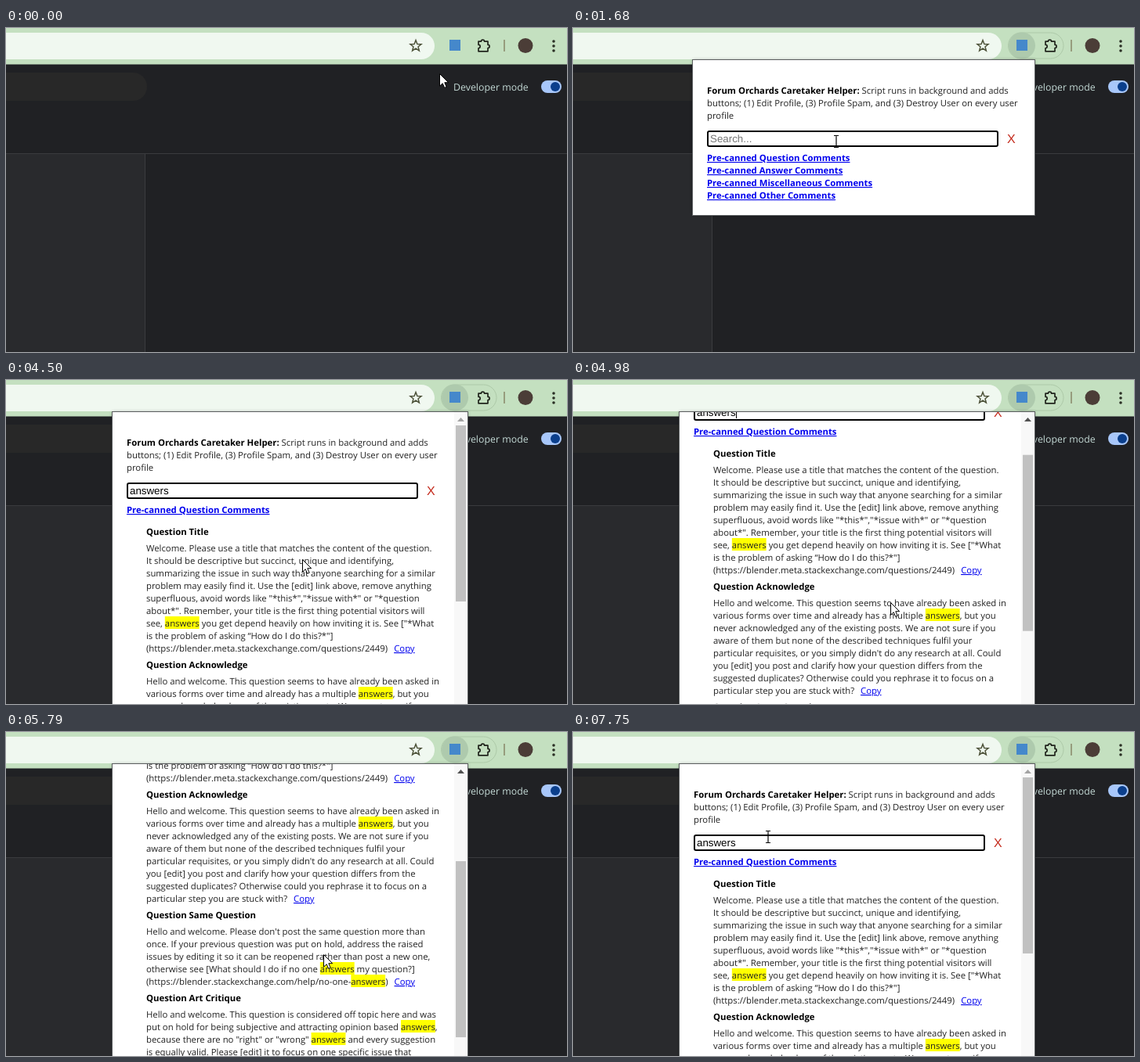
Write an HTML page that moves like this. It is 716 px wide and 414 px high and loops after 8000 ms.

```html
<!DOCTYPE html>
<html lang="en">
<head>
<meta charset="utf-8">
<title>Comment search popup</title>
<style>
html, body { margin: 0; width: 100%; height: 100%; overflow: hidden; background: #202124; }
svg { display: block; width: 716px; height: 414px; text-rendering: geometricPrecision; }
text { font: 11.33px "Open Sans", sans-serif; fill: #222; white-space: pre; }
.b { font-weight: 700; fill: #000; }
.link { fill: #00e; text-decoration: underline; }
.field { font: 13.33px "Liberation Sans", Arial, sans-serif; fill: #000; }
.hint { fill: #757575; }
.clear { font: 16px "Liberation Sans", Arial, sans-serif; fill: #c42a1c; }
.mode { font-size: 12.37px; fill: #c3d9d5; }
</style>
</head>
<body>
<svg viewBox="0 0 716 414">
  <defs>
    <filter id="blur" x="-5%" y="-5%" width="110%" height="110%"><feGaussianBlur stdDeviation="2"/></filter>
    <clipPath id="view"><rect id="viewBox" y="41" height="400"/></clipPath>
  </defs>

  <!-- page -->
  <rect width="716" height="414" fill="#202124"/>
  <rect x="-40" y="57" width="220" height="36" rx="18" fill="#282828"/>
  <rect y="161" width="177" height="253" fill="#292a2d"/>
  <path d="M0 160.5H716M177.5 161V414" stroke="#3a3b3e" fill="none"/>
  <text class="mode" x="571" y="80">Developer mode</text>
  <rect x="683" y="67" width="26" height="16" rx="8" fill="#a8c7fa"/>
  <circle cx="701" cy="75" r="6" fill="#0b3f8c"/>

  <!-- toolbar -->
  <rect width="716" height="46.5" fill="#c4e0c0"/>
  <rect x="-40" y="6" width="587" height="34" rx="17" fill="#f0f8f0"/>
  <g id="hover">
    <rect x="555.5" y="6" width="70.5" height="33" rx="16.5" fill="none" stroke="#adc9a8"/>
    <circle id="press" cx="573" cy="22.5" r="17" fill="#aecaad"/>
  </g>
  <polygon id="star" fill="none" stroke="#4d5239" stroke-width="1.5"/>
  <rect x="566" y="15" width="14" height="14" fill="#4588cb"/>
  <path d="M603 17.2h3.4a2.1 2.1 0 0 1 4.2 0h4.4v4.2a2.1 2.1 0 0 1 0 4.2v4.2h-12v-4a2.1 2.1 0 0 0 0-4.4z"
        fill="none" stroke="#20241c" stroke-width="1.7" stroke-linejoin="round"/>
  <rect x="635" y="15" width="2" height="15" fill="#979c7d"/>
  <circle cx="663" cy="22.5" r="9.5" fill="#4b3d37"/>
  <g fill="#2a2f24">
    <circle cx="699" cy="17" r="1.8"/><circle cx="699" cy="23" r="1.8"/><circle cx="699" cy="29" r="1.8"/>
  </g>

  <!-- popup -->
  <g id="popup">
    <rect id="shadow" y="41" fill="#000" opacity=".4" filter="url(#blur)"/>
    <rect id="panel" y="40.5" fill="#fff" stroke="#5b5e60"/>
    <g clip-path="url(#view)">
      <g id="scroller">
        <g id="content"></g>
        <rect id="caret" y="134" width="1" height="15"/>
      </g>
    </g>
    <g id="bar">
      <rect x="572" y="41" width="17" height="373" fill="#f8f8f8"/>
      <path id="arrow" d="M576 53l4.5-5 4.5 5z"/>
      <rect id="thumb" x="574" width="13" fill="#c1c1c1"/>
    </g>
  </g>

  <g id="pointer">
    <path id="tip" d="M.5.5V16.2L4.2 12.7 6.7 18.4 9.2 17.3 6.8 11.7H11.7Z" fill="#fff" stroke="#000"/>
    <path id="beam" d="M-3-7.5h2.5l.5.5.5-.5H3M-3 7.5h2.5l.5-.5.5.5H3M0-7V7" fill="none" stroke="#000" stroke-width="1.2"/>
  </g>
</svg>
<script>
const LOOP = 8000;
const $ = id => document.getElementById(id);

const intro = [
  'Script runs in background and adds',
  'buttons; (1) Edit Profile, (3) Profile Spam, and (3) Destroy User on every user',
  'profile'
];
const groups = ['Question', 'Answer', 'Miscellaneous', 'Other'];
const items = [
  ['Question Unanswerable', `Hello and welcome. As it stands this question is unanswerable and was
put on hold for lack of essential details to understand the issue.
Risking stating the obvious, only you have access to your scene, so
unless you describe it thoroughly you alone know your exact setup,
settings and what steps you took to arrive where your are now.
Describe the issue in detail, add [images]
(https://meta.stackexchange.com/questions/75491) of relevant
settings and user interface, with the [edit] button above. Don't post
comments or ask a new question, editing will automatically queue it
for reopening review.`],
  ['Question Title', `Welcome. Please use a title that matches the content of the question.
It should be descriptive but succinct, unique and identifying,
summarizing the issue in such way that anyone searching for a similar
problem may easily find it. Use the [edit] link above, remove anything
superfluous, avoid words like "*this*","*issue with*" or "*question
about*". Remember, your title is the first thing potential visitors will
see, answers you get depend heavily on how inviting it is. See ["*What
is the problem of asking “How do I do this?*"]
(https://blender.meta.stackexchange.com/questions/2449)`],
  ['Question Acknowledge', `Hello and welcome. This question seems to have already been asked in
various forms over time and already has a multiple answers, but you
never acknowledged any of the existing posts. We are not sure if you
aware of them but none of the described techniques fulfil your
particular requisites, or you simply didn't do any research at all. Could
you [edit] you post and clarify how your question differs from the
suggested duplicates? Otherwise could you rephrase it to focus on a
particular step you are stuck with?`],
  ['Question Same Question', `Hello and welcome. Please don't post the same question more than
once. If your previous question was put on hold, address the raised
issues by editing it so it can be reopened rather than post a new one,
otherwise see [What should I do if no one answers my question?]
(https://blender.stackexchange.com/help/no-one-answers)`],
  ['Question Art Critique', `Hello and welcome. This question is considered off topic here and was
put on hold for being subjective and attracting opinion based answers,
because there are no "right" or "wrong" answers and every suggestion
is equally valid. Please [edit] it to focus on one specific issue that
can be solved objectively.`]
];

// [time, text in the field, thumb height]
const typing = [
  [0, '', 0], [1740, 'a', 0], [2020, 'an', 62], [2430, 'ans', 100], [2960, 'answ', 115],
  [3290, 'answe', 115], [3360, 'answer', 115], [3820, 'answers', 225]
];
const pointerPath = [
  [70, 553, 58], [340, 568, 20], [620, 568, 20], [760, 525, 42], [1210, 336, 145],
  [4350, 336, 145], [4600, 405, 284], [6190, 405, 284], [6400, 361, 206],
  [6900, 361, 206], [7290, 307, 190], [7500, 211, 142], [7750, 249, 134]
];
const scrollPath = [
  [4560, 0], [4980, 100], [5120, 140], [5390, 236], [5930, 300],
  [6500, 300], [6690, 265], [7290, 0]
];

const pen = document.createElement('canvas').getContext('2d');
pen.textRendering = 'geometricPrecision';
function widthOf(text, font = '11.33px "Open Sans", sans-serif') {
  pen.font = font;
  return pen.measureText(text).width;
}
const fieldWidth = text => widthOf(text, '13.33px "Liberation Sans", Arial, sans-serif');

// Linear blend between timed points
function along(path, t) {
  const next = path.findIndex(p => p[0] > t);
  if (next === 0) return path[0].slice(1);
  if (next < 0) return path[path.length - 1].slice(1);
  const a = path[next - 1], b = path[next], k = (t - a[0]) / (b[0] - a[0]);
  return a.slice(1).map((v, i) => v + (b[i + 1] - v) * k);
}

const set = (el, attrs) => { for (const k in attrs) el.setAttribute(k, attrs[k]); };
const show = (el, on) => { el.style.display = on ? '' : 'none'; };
const label = (x, y, text, cls = '') => `<text x="${x}" y="${y}" class="${cls}">${text}</text>`;

function marks(x, y, line, query) {
  let out = '';
  for (let i = line.indexOf(query); i >= 0; i = line.indexOf(query, i + query.length)) {
    out += `<rect x="${x + widthOf(line.slice(0, i))}" y="${y - 13}" width="${widthOf(query)}" height="16" fill="#ff0"/>`;
  }
  return out;
}

function results(x, query) {
  let y = 198, out = '';
  for (const [title, body] of items.filter(it => it[1].includes(query))) {
    const lines = body.split('\n');
    out += label(x, y, title, 'b');
    y += 21;
    lines.forEach((line, i) => {
      const last = i === lines.length - 1;
      out += marks(x, y, line, query) +
        label(x, y, line + (last ? '<tspan dx="8" class="link">Copy</tspan>' : ''));
      y += last ? 21 : 16;
    });
  }
  return out;
}

function buildContent(x, query, wide) {
  let out = label(x, 84, `<tspan class="b">Forum Orchards Caretaker Helper:</tspan> ${intro[0]}`) +
    label(x, 100, intro[1]) + label(x, 116, intro[2]);
  out += `<rect x="${x + 1}" y="132" width="370" height="19" rx="2" fill="#fff" stroke="#000" stroke-width="2"/>`;
  out += label(x + 4, 146, query || 'Search...', query ? 'field' : 'field hint');
  out += label(x + 383, 147, 'X', 'clear');
  groups.slice(0, wide ? 1 : 4).forEach((g, i) => {
    out += label(x, 170 + 16 * i, `Pre-canned ${g} Comments`, 'b link');
  });
  return out + (wide ? results(x + 25, query) : '');
}

let shown = null;
function drawPopup(t) {
  show($('popup'), t >= 620);
  const [, query, thumb] = typing.filter(k => k[0] <= t).pop();
  const wide = thumb > 0, x = wide ? 154 : 171;
  if (query !== shown) {
    shown = query;
    const left = x - 18, w = 589 - left, h = wide ? 400 : 198;
    set($('shadow'), { x: left, width: w, height: h });
    set($('panel'), { x: left - .5, width: w + 1, height: h + 1 });
    set($('viewBox'), { x: left, width: w });
    $('content').innerHTML = buildContent(x, query, wide);
    set($('caret'), { x: Math.round(x + 4 + fieldWidth(query)) });
    show($('bar'), wide);
  }
  const scroll = Math.round(along(scrollPath, t)[0]);
  set($('scroller'), { transform: `translate(0 ${-scroll})` });
  set($('thumb'), { y: 58 + scroll * .377, height: thumb });
  set($('arrow'), { fill: scroll ? '#505050' : '#a3a3a3' });
  const typingNow = t >= 1740 && t < 4350;
  const phase = t < 1740 ? t - 1180 : t - 4850;
  show($('caret'), typingNow || (phase + LOOP) % 1000 < 500);
}

function drawPointer(t) {
  const [x, y] = along(pointerPath, t).map(Math.round);
  const inField = t > 620 && y > 130 && y < 153 && x < 526;
  set($('pointer'), { transform: `translate(${x} ${y})` });
  show($('tip'), !inField);
  show($('beam'), inField);
}

function draw(t) {
  set($('hover'), { opacity: Math.min(1, Math.max(0, (t - 140) / 200)) });
  set($('press'), { fill: t < 480 ? '#b6d2b3' : '#aecaad' });
  drawPopup(t);
  drawPointer(t);
}

set($('star'), {
  points: Array.from({ length: 10 }, (_, i) => {
    const r = i % 2 ? 3.2 : 7.4, a = i * Math.PI / 5;
    return [523 + r * Math.sin(a), 23 - r * Math.cos(a)].map(v => v.toFixed(2));
  }).join(' ')
});

const start = performance.now();
function tick() {
  draw((performance.now() - start) % LOOP);
  requestAnimationFrame(tick);
}
tick();
</script>
</body>
</html>
```
